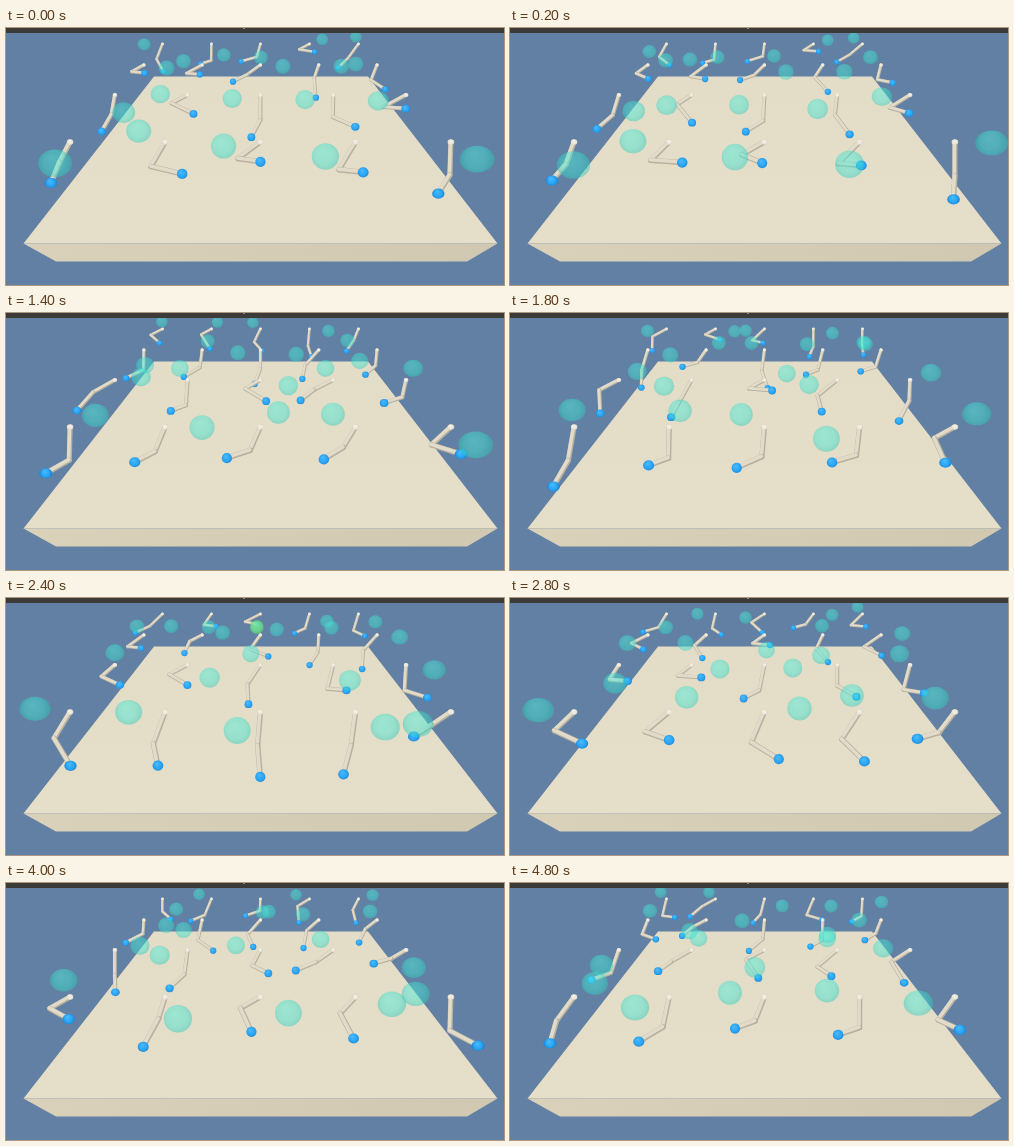
Recreate the animation shown at these times as an HTML page with a canvas. Size 498x257 px, loop 5000 ms.

```html
<!DOCTYPE html>
<html lang="en">
<head>
<meta charset="utf-8">
<title>Robot arms reaching for moving goals</title>
<style>
html, body { margin: 0; width: 100%; height: 100%; overflow: hidden; background: #6280a3; }
canvas { display: block; }
</style>
</head>
<body>
<canvas id="stage" width="498" height="257"></canvas>
<script>
const ctx = document.getElementById('stage').getContext('2d');
const LOOP = 5000;
const TICK = 200;
const RESET = 14; // tick at which all agents start a new episode
const CHANGES = [0, 200, 800, 1400, 1800, 2400, 2800, 3000, 3400, 4000, 4200, 4800];

let seed = 11;
function random(min, max) {
  seed = (seed * 16807) % 2147483647;
  return min + (max - min) * seed / 2147483647;
}

const wave = (mid, amp) => ({ mid, amp, speed: random(.25, .5), phase: random(0, 2 * Math.PI) });
const valueAt = (w, tick) => w.mid + w.amp * Math.sin(w.speed * tick + w.phase);

const agents = [];
function addRow(y, gap, ...goals) {
  goals.forEach((goal, col) => agents.push({
    x: 254.5 + (col - 2) * gap, y, scale: gap / 95.2, goal,
    shoulder: wave(-.55, .55), forearm: wave(.1, 1.4),
    upperReach: wave(.83, .17), lowerReach: wave(.83, .17),
  }));
}

// Per agent: goal angle and degrees per tick, for each of the two episodes
addRow(16, 49, [165, 41, 268, -52], [-50, -34, 162, -5.2], [-89, 29, 183, 15.5], [48, -6, 12, -39.5], [98, 19.5, 105, -10.5]);
addRow(37, 58.3, [0, 39, 205, 24], [146, -10, 204, 1.8], [8, -27, 275, 25.5], [8, -26, 92, -53], [161, -43, 21, 14.5]);
addRow(67, 72.8, [288, 13.5, 262, -39], [165, 43, -4, -28], [182, 24, 0, 25], [186, 40, 125, -1.4], [191, -16.5, 112, -31]);
addRow(114, 95.2, [246, 23, 166, -11], [136, 33, 62, -22], [183, 34, 19, 50], [215, 39, 102, 41], [315, 51, 122, 6.7]);

// Goals circle flat around the base of their arm
function goalAt({ x, y, scale, goal: [a, va, b, vb] }, tick) {
  const degrees = tick < RESET ? a + va * tick : b + vb * (tick - RESET);
  const angle = degrees * Math.PI / 180;
  return [x + 37 * scale * Math.cos(angle), y + 3 - 20 * scale * Math.sin(angle)];
}

// Angles are measured from straight down
function extend([x, y], angle, length) {
  return [x + length * Math.sin(angle), y + length * Math.cos(angle)];
}

function armAt(a, tick) {
  const elbow = extend([a.x, a.y], valueAt(a.shoulder, tick), 34 * a.scale * valueAt(a.upperReach, tick));
  const hand = extend(elbow, valueAt(a.forearm, tick), 32 * a.scale * valueAt(a.lowerReach, tick));
  return { elbow, hand };
}

function polygon(fill, ...points) {
  ctx.fillStyle = fill;
  ctx.beginPath();
  points.forEach(([x, y]) => ctx.lineTo(x, y));
  ctx.closePath();
  ctx.fill();
}

function gradient(x1, y1, x2, y2, from, to) {
  const g = ctx.createLinearGradient(x1, y1, x2, y2);
  g.addColorStop(0, from);
  g.addColorStop(1, to);
  return g;
}

function shade(x, y, r, light, mid, dark) {
  const g = ctx.createRadialGradient(x - r * .25, y - r * .4, 0, x, y, r * 1.25);
  g.addColorStop(0, light);
  g.addColorStop(.6, mid);
  g.addColorStop(1, dark);
  return g;
}

// The wide-angle view stretches spheres towards the sides
function sphere(x, y, r, ...colors) {
  const stretch = 1 + .38 * ((x - 249) / 249) ** 2;
  ctx.fillStyle = shade(x, y, r, ...colors);
  ctx.beginPath();
  ctx.ellipse(x, y, r * stretch, r, 0, 0, 2 * Math.PI);
  ctx.fill();
}

function limb([x1, y1], [x2, y2], width) {
  const line = (color, w, d) => {
    ctx.strokeStyle = color;
    ctx.lineWidth = w;
    ctx.beginPath();
    ctx.moveTo(x1 - d, y1 - d);
    ctx.lineTo(x2 - d, y2 - d);
    ctx.stroke();
  };
  line('#b8b19f', width, 0);
  line('#e2dbc9', width * .68, width * .11);
}

function drawArm({ x, y, scale }, { elbow, hand }) {
  limb([x, y], elbow, 5.2 * scale);
  limb(elbow, hand, 5.4 * scale);
  sphere(x, y, 2.7 * scale, '#f4f0e6', '#eee9de', '#d8d2c2');
  sphere(...hand, 5.1 * scale, '#4bbcff', '#2ba5f6', '#1c82cc');
}

function drawGoal([x, y], hand) {
  const r = 5 + .064 * y;
  const touched = Math.hypot(hand[0] - x, hand[1] - y) < r * .45;
  const colors = touched
    ? ['rgba(128,240,160,.85)', 'rgba(105,222,140,.85)', 'rgba(75,175,110,.85)']
    : ['rgba(80,240,220,.47)', 'rgba(62,228,210,.47)', 'rgba(45,190,176,.5)'];
  sphere(x, y, r, ...colors);
}

function drawRoom() {
  ctx.fillStyle = '#6280a3';
  ctx.fillRect(0, 0, 498, 257);
  polygon(gradient(0, 48, 0, 215, '#e3dcc6', '#e5dec9'),
    [148, 48.5], [362, 48.5], [491.5, 215.5], [17.5, 215.5]);
  polygon(gradient(18, 0, 491, 0, '#dad1bb', '#d1c8b1'),
    [17.5, 215.5], [491.5, 215.5], [461, 233.5], [50, 233.5]);
}

function drawTitleBar() {
  ctx.fillStyle = '#3d3b38';
  ctx.fillRect(0, 0, 498, 5);
  ctx.fillStyle = '#8a8883';
  ctx.fillRect(237, 0, 2, 1);
}

function draw(tick) {
  drawRoom();
  ctx.lineCap = 'round';
  for (const a of agents) {
    const arm = armAt(a, tick);
    drawArm(a, arm);
    drawGoal(goalAt(a, tick), arm.hand);
  }
  drawTitleBar();
}

function frame() {
  const t = performance.now() % LOOP;
  draw(CHANGES.findLast(start => start <= t) / TICK);
  requestAnimationFrame(frame);
}
frame();
</script>
</body>
</html>
```
